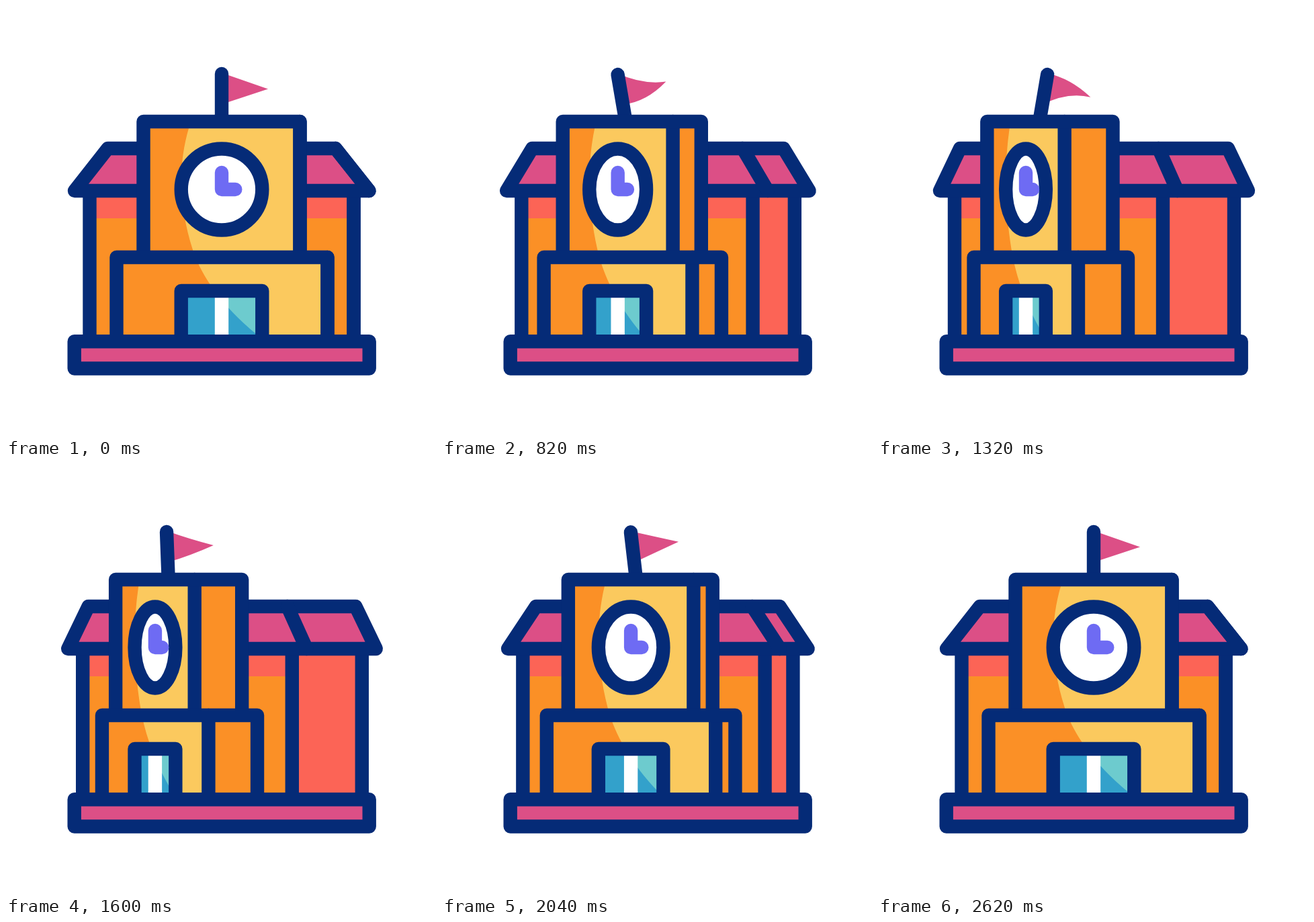
An HTML page with a canvas that plays this animation: 640x640 px, repeating every 3000 ms.

```html
<!DOCTYPE html>
<html lang="en">
<head>
<meta charset="utf-8">
<title>School building</title>
<style>
  html, body { margin: 0; width: 100%; height: 100%; overflow: hidden; background: #fff; }
  canvas { display: block; width: 640px; height: 640px; }
</style>
</head>
<body>
<canvas id="stage" width="640" height="640"></canvas>
<script>
const ctx = document.getElementById('stage').getContext('2d');
const LOOP = 3000, STEP = 20, LINE = 20.4;
const NAVY = '#052b77', ORANGE = '#fb9026', YELLOW = '#fbc95e', PINK = '#dc4f86', RED = '#fc6456',
      BLUE = '#33a1cb', TEAL = '#6dcbce', PURPLE = '#6e6bf3', WHITE = '#fff';

const smooth = x => x * x * (3 - 2 * x);
const cubic = x => x < .5 ? 4 * x ** 3 : 1 - 4 * (1 - x) ** 3;
const mix = (a, b, p) => a + (b - a) * p;

// Eased value of a list of [time, value] keys
function track(t, keys) {
  if (t <= keys[0][0]) return keys[0][1];
  for (let i = 1; i < keys.length; i++) {
    const [t0, a] = keys[i - 1], [t1, b] = keys[i];
    if (t < t1) return mix(a, b, smooth((t - t0) / (t1 - t0)));
  }
  return keys[keys.length - 1][1];
}

// How far the building has turned, 0 to 1
function turnAt(t) {
  if (t < 1400) return track(t, [[200, 0], [1310, 1]]);
  return 1 - cubic(Math.min(1, (t - 1400) / 1190));
}

const leanAt = t => track(t, [[220, 0], [800, -9.8], [1310, 9.7], [1810, -9.5], [2440, 0]]) * Math.PI / 180;
const bendAt = t => track(t, [[200, 0], [520, 1], [820, 1], [1320, -1], [1820, 1], [2260, -1], [2600, 0]]);

function box(color, x0, y0, x1, y1) {
  ctx.fillStyle = color;
  ctx.fillRect(x0, y0, x1 - x0, y1 - y0);
}

function poly(points, { fill, stroke = NAVY, closed = false }) {
  ctx.beginPath();
  points.forEach(([x, y]) => ctx.lineTo(x, y));
  if (closed) ctx.closePath();
  if (fill) { ctx.fillStyle = fill; ctx.fill(); }
  ctx.strokeStyle = stroke;
  ctx.stroke();
}

function drawFlag(x, lean, bend) {
  ctx.save();
  ctx.translate(x, 172);
  ctx.rotate(lean);
  ctx.beginPath();
  ctx.moveTo(0, -72.5);
  ctx.quadraticCurveTo(34.5, -60.5 + 11 * bend, 69, -48.5);
  ctx.quadraticCurveTo(34.5, -37.1 + 14 * bend, 0, -25.7);
  ctx.fillStyle = PINK;
  ctx.fill();
  poly([[0, -71], [0, 0]], {});
  ctx.restore();
}

function drawWings(p) {
  const left = mix(124.5, 114, p), right = mix(517.5, 530, p), edge = mix(517.5, 424, p);
  box(ORANGE, left, 275, edge, 499);
  box(RED, left, 275, edge, 316);
  box(RED, edge, 275, right, 499);
  for (const x of [left, edge, right]) poly([[x, 275], [x, 499]], {});
  poly([[mix(102, 92, p), 275], [mix(151.5, 122, p), 212],
        [mix(490.5, 521, p), 212], [mix(540.5, 551, p), 275]], { fill: PINK, closed: true });
  poly([[mix(490.5, 417.5, p), 212], [mix(540.5, 445.5, p), 275]], {});
}

function drawBlock(left, edge, right, top, bottom, shade) {
  box(ORANGE, edge, top, right, bottom);
  box(YELLOW, left, top, edge, bottom);
  ctx.save();
  ctx.beginPath();
  ctx.rect(left, top, edge - left, bottom - top);
  ctx.clip();
  ctx.fillStyle = ORANGE;
  ctx.fill(shade);
  ctx.restore();
  poly([[edge, top], [edge, bottom]], {});
  poly([[left, bottom], [left, top], [right, top], [right, bottom]], {});
}

function drawDoor(cx, half, shade) {
  box(TEAL, cx - half, 424, cx + half, 499);
  ctx.save();
  ctx.beginPath();
  ctx.rect(cx - half, 424, half * 2, 75);
  ctx.clip();
  ctx.fillStyle = BLUE;
  ctx.fill(shade);
  ctx.restore();
  box(WHITE, cx - 10.2, 424, cx + 10.2, 499);
  poly([[cx - half, 499], [cx - half, 424], [cx + half, 424], [cx + half, 499]], {});
}

function drawClock(cx, s) {
  ctx.beginPath();
  ctx.ellipse(cx, 273, 60.3 * s, 60.5, 0, 0, Math.PI * 2);
  ctx.fillStyle = WHITE;
  ctx.fill();
  ctx.strokeStyle = NAVY;
  ctx.stroke();
  poly([[cx, 248], [cx, 273], [cx + 20.3 * s, 273]], { stroke: PURPLE });
}

function draw(t) {
  const p = turnAt(t), cx = 321 - 101 * p, s = 1 - .505 * p;
  const front = x => cx + (x - 321) * s;

  // One shadow curve runs down the whole front
  const shade = new Path2D();
  shade.moveTo(front(100), 160);
  shade.lineTo(front(279), 160);
  shade.lineTo(front(272), 182);
  shade.bezierCurveTo(front(255), 240, front(258), 300, front(278), 363);
  shade.bezierCurveTo(front(290), 400, front(320), 445, front(372), 488);
  shade.lineTo(front(387), 500);
  shade.lineTo(front(100), 500);

  ctx.fillStyle = WHITE;
  ctx.fillRect(0, 0, 640, 640);
  ctx.lineWidth = LINE;
  ctx.lineJoin = ctx.lineCap = 'round';

  drawFlag(321 - 80.8 * p, leanAt(t), bendAt(t));
  drawWings(p);
  drawBlock(front(204.5), front(437.5), mix(437.5, 349.5, p), 172, 374, shade);
  drawBlock(front(164.5), front(478.5), mix(478.5, 372, p), 374, 499, shade);
  drawDoor(cx, 60.3 * s, shade);
  drawClock(cx, s);
  poly([[101.7, 499.3], [540.7, 499.3], [540.7, 539.5], [101.7, 539.5]], { fill: PINK, closed: true });
}

function tick() {
  const t = performance.now() % LOOP;
  draw(Math.floor(t / STEP) * STEP);
  requestAnimationFrame(tick);
}
tick();
</script>
</body>
</html>
```
